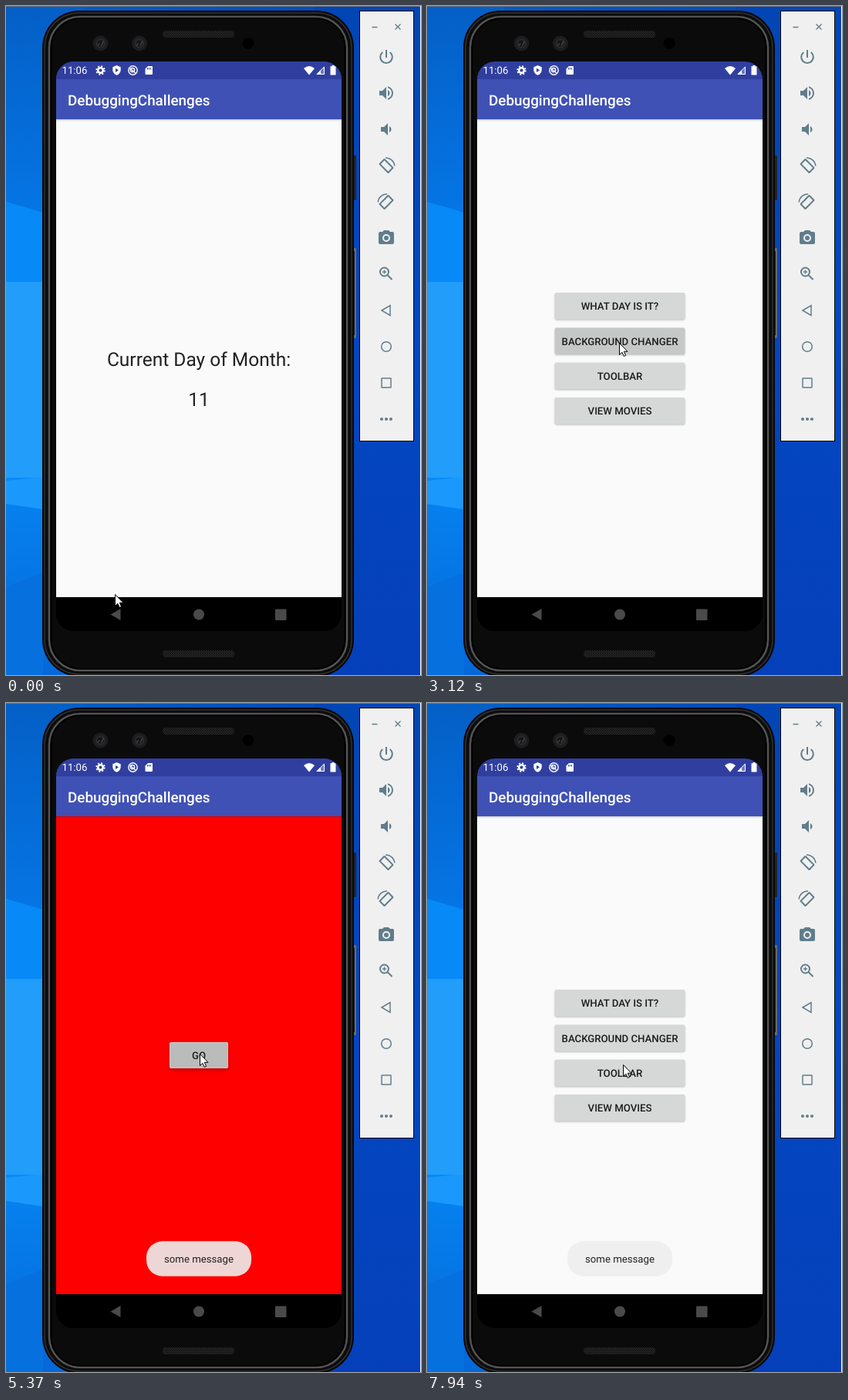
An HTML page for the animation above (8000 ms loop, 538 px wide and 868 px high).

```html
<!DOCTYPE html>
<html lang="en">
<head>
<meta charset="utf-8">
<title>Phone emulator demo</title>
<style>
html, body { margin: 0; width: 100%; height: 100%; overflow: hidden; background: #0540ba; }
svg { display: block; width: 538px; height: 868px; }
text { font-family: Roboto, sans-serif; fill: #212121; text-rendering: geometricPrecision; }
.mid { text-anchor: middle; }
.title { font-size: 18.85px; font-weight: 500; fill: #fff; }
.big { font-size: 24.5px; }
.label { font-size: 13.19px; font-weight: 500; text-anchor: middle; fill: #1c1c1c; }
.small { font-size: 13.19px; }
.light { fill: #fff; }
.raised { filter: drop-shadow(0 1px 1px rgba(0,0,0,.25)); }
.button { fill: #d6d7d7; }
.line { fill: none; stroke: #607d8b; stroke-width: 2; }
.line.thin { stroke-width: 1.5; }

.window { transform-origin: 250px 441.5px; }
#menu, #day, #go, #page, #press, #ripple, #toast, #cursor, #goButton, #changer {
  animation: 8s step-end -5ms infinite;
}
#day { animation-name: day; }
#menu { animation-name: menu; }
#go { animation-name: go; }
#page { animation-name: page; }
#goButton { animation-name: lift; }
#press { animation-name: press; }
#ripple { animation-name: ripple; }
#changer { animation-name: changer; }
#toast { animation-name: toast; }
#cursor { animation-name: cursor; }

@keyframes day { 0% { opacity: 1 } 22% { opacity: 0 } }
@keyframes menu {
  0% { transform: scale(1.03) }
  23.5% { transform: scale(1.005) }
  25.375% { transform: scale(1) }
  42% { transform: scale(1.045) }
  89.5% { transform: scale(1.016) }
  91.375% { transform: scale(1.003) }
  92.875% { transform: scale(1) }
}
@keyframes go {
  0% { opacity: 0; transform: scale(.985) }
  42% { opacity: 1; transform: scale(.985) }
  43.5% { opacity: 1; transform: scale(1) }
  89.5% { opacity: 0; transform: scale(1) }
}
@keyframes page {
  0% { fill: #fafafa }
  51.875%, 67.125% { fill: #f00 }
  58.375%, 75.125% { fill: #00f }
}
@keyframes lift {
  0%, 53.625%, 60.25%, 69%, 76.625% { filter: drop-shadow(0 1px 1px rgba(0,0,0,.25)) }
  50%, 58.375%, 67.125%, 75.125% { filter: drop-shadow(0 2px 2.5px rgba(0,0,0,.28)) }
}
@keyframes press {
  0%, 55.375%, 60.25%, 70.5%, 78.375% { opacity: 0 }
  50%, 58.375%, 67.125%, 75.125% { opacity: 1 }
  53.625%, 69%, 76.625% { opacity: .4 }
}
@keyframes ripple { 0%, 58.375% { opacity: 0 } 56.875% { opacity: 1 } }
@keyframes changer {
  0%, 43.5% { fill: #d6d7d7 }
  39% { fill: #c6c7c7 }
  40.5% { fill: #babcbb }
}
@keyframes toast { 0% { opacity: 0 } 53.625% { opacity: .5 } 55.375% { opacity: 1 } }
@keyframes cursor {
  0% { transform: translate(141px, 763px) }
  16.5% { transform: translate(138px, 780px) }
  18.125% { transform: translate(141px, 787px) }
  27% { transform: translate(198px, 535px) }
  28.875% { transform: translate(246px, 469px) }
  30.75% { transform: translate(245px, 460px) }
  32.25% { transform: translate(250px, 450px) }
  33.75% { transform: translate(253px, 443px) }
  35.25% { transform: translate(250px, 439px) }
  37.125% { transform: translate(249px, 437px) }
  45% { transform: translate(255px, 448px) }
  46.875% { transform: translate(251px, 455px) }
  78.375% { transform: translate(116px, 721px) }
  80.375% { transform: translate(120px, 778px) }
  82.25% { transform: translate(130px, 794px) }
  84.125% { transform: translate(149px, 794px) }
  92.875% { transform: translate(205px, 610px) }
  94.375% { transform: translate(262px, 485px) }
  95.875% { transform: translate(274px, 460px) }
  99.25% { transform: translate(254px, 469px) }
}
</style>
</head>
<body>
<svg viewBox="0 0 538 868">
  <defs>
    <linearGradient id="across">
      <stop offset="0" stop-color="#045fc6"/>
      <stop offset="1" stop-color="#0246b4"/>
    </linearGradient>
    <linearGradient id="sky" x2="0" y2="1">
      <stop offset="0" stop-color="#045fc6"/>
      <stop offset=".3" stop-color="#0575e4"/>
      <stop offset=".75" stop-color="#0680ee"/>
      <stop offset="1" stop-color="#0568d8"/>
    </linearGradient>
    <linearGradient id="night" x2="0" y2="1">
      <stop offset="0" stop-color="#0246b4"/>
      <stop offset=".5" stop-color="#0347c2"/>
      <stop offset="1" stop-color="#0540ba"/>
    </linearGradient>
    <linearGradient id="shade" x2="0" y2="1">
      <stop offset="0" stop-opacity=".18"/>
      <stop offset="1" stop-opacity="0"/>
    </linearGradient>
    <pattern id="mesh" width="3" height="3" patternUnits="userSpaceOnUse">
      <rect width="3" height="3" fill="#262626"/>
      <path d="M0 0l3 3M3 0L0 3" stroke="#111" stroke-width=".8"/>
    </pattern>
    <clipPath id="screen"><rect x="65" y="72" width="370" height="739" rx="23"/></clipPath>
    <clipPath id="goShape"><rect x="212" y="440" width="76" height="34" rx="2"/></clipPath>
    <g id="chrome">
      <rect x="65" y="72" width="370" height="23.200" fill="#303f9f"/>
      <rect x="65" y="95" width="370" height="52" fill="#3f51b5"/>
      <rect x="65" y="147" width="370" height="3" fill="url(#shade)"/>
      <text class="title" x="80" y="128.500">DebuggingChallenges</text>
      <rect x="65" y="767" width="370" height="46"/>
    </g>
    <g id="lens">
      <circle r="10" fill="#1d1d1f"/>
      <circle r="6.500" fill="#29292b"/>
      <circle r="4" fill="#151517"/>
      <path d="M-4 3l3-3M1 3l3-6" stroke="#434347" stroke-width="1.500"/>
    </g>
    <g id="turn">
      <rect x="-4.300" y="-7.800" width="8.600" height="15.600" rx=".5" class="line" transform="rotate(-45)"/>
      <path class="line thin" d="M-1-10.500A11.500 11.500 0 0 1 10.800 0"/>
    </g>
  </defs>

  <!-- desktop -->
  <rect width="538" height="868" fill="url(#across)"/>
  <rect width="100" height="868" fill="url(#sky)"/>
  <rect x="400" width="138" height="868" fill="url(#night)"/>
  <path d="M0 254L48 268V653L0 646z" fill="#078af8"/>
  <path d="M0 616L48 611V653L0 646z" fill="#1a98fc"/>
  <rect x="-207" y="358" width="254" height="254" fill="#229df9"/>
  <path d="M0 754L48 735V868H0z" fill="#0570de"/>
  <rect width="538" height="1" fill="#6c7078"/>
  <rect x="537" width="1" height="868" fill="#fff"/>

  <!-- phone body -->
  <rect x="449" y="194" width="5" height="58" rx="1" fill="#242424"/>
  <rect x="449" y="314" width="5" height="117" rx="1" fill="#6a6a6a"/>
  <rect x="450" y="318" width="2" height="109" fill="#222"/>
  <g fill="none">
    <rect x="47.500" y="6.500" width="403" height="863" rx="47" fill="#0b0b0b" stroke="#050505"/>
    <rect x="50" y="9" width="398" height="858" rx="45" stroke="#303030" stroke-width="1.500"/>
    <rect x="53" y="11.500" width="392" height="853" rx="43" stroke="#0c0c0c" stroke-width="3"/>
    <rect x="56" y="14" width="386" height="848" rx="40" stroke="#545454" stroke-width="2.500"/>
    <rect x="58.500" y="16" width="381" height="844" rx="38" stroke="#000" stroke-width="2"/>
  </g>
  <rect x="203" y="32" width="93" height="9" rx="4" fill="url(#mesh)"/>
  <rect x="203" y="836" width="93" height="9" rx="4" fill="url(#mesh)"/>
  <use href="#lens" x="122.500" y="48.500"/>
  <use href="#lens" x="173" y="48.500"/>
  <circle cx="314" cy="48.500" r="7.500" fill="#000"/>

  <!-- phone screen -->
  <g clip-path="url(#screen)">
    <rect x="65" y="72" width="370" height="739"/>
    <g id="menu" class="window">
      <rect x="65" y="72" width="370" height="739" fill="#fafafa"/>
      <use href="#chrome"/>
      <g class="raised">
        <rect class="button" x="165.700" y="372" width="168.600" height="34.500" rx="2"/>
        <rect id="changer" x="165.700" y="417.400" width="168.600" height="34.500" rx="2"/>
        <rect class="button" x="165.700" y="462.700" width="168.600" height="34.500" rx="2"/>
        <rect class="button" x="165.700" y="508" width="168.600" height="34.500" rx="2"/>
      </g>
      <text class="label" x="250" y="394.200">WHAT DAY IS IT?</text>
      <text class="label" x="250" y="439.500">BACKGROUND CHANGER</text>
      <text class="label" x="250" y="484.900">TOOLBAR</text>
      <text class="label" x="250" y="530.200">VIEW MOVIES</text>
    </g>
    <g id="day" class="window">
      <rect x="65" y="72" width="370" height="739" fill="#fafafa"/>
      <use href="#chrome"/>
      <text class="big mid" x="250" y="467">Current Day of Month:</text>
      <text class="big mid" x="250" y="519">11</text>
    </g>
    <g id="go" class="window">
      <rect id="page" x="65" y="72" width="370" height="739"/>
      <use href="#chrome"/>
      <g id="goButton">
        <rect class="button" x="212" y="440" width="76" height="34" rx="2"/>
        <g clip-path="url(#goShape)">
          <circle id="ripple" cx="251" cy="458" r="27" fill="#c6c8c7"/>
        </g>
        <rect id="press" x="212.500" y="440.500" width="75" height="33" rx="2" fill="#babcbb"/>
      </g>
      <text class="label" x="250" y="462.200">GO</text>
    </g>
    <g id="toast">
      <rect x="182" y="698.300" width="136" height="45.400" rx="20.700" fill="#eee" fill-opacity=".9"/>
      <text class="small mid" x="250" y="726">some message</text>
    </g>

    <!-- status bar -->
    <g fill="#fff">
      <text class="small light" x="72.500" y="88">11:06</text>
      <g fill="none" stroke="#fff">
        <circle cx="122.500" cy="83.500" r="3.300" stroke-width="2.500"/>
        <circle cx="122.500" cy="83.500" r="5.300" stroke-width="1.800" stroke-dasharray="2.080"/>
        <circle cx="164.500" cy="83.500" r="5.700" stroke-width="1.400"/>
        <circle cx="164" cy="83" r="2.600" stroke-width="1.500"/>
        <path d="M160.500 81l7.500 6" stroke-width="1.300"/>
      </g>
      <path d="M143.500 77l5.200 2.300v3.500c0 3.200-2.200 6-5.200 7-3-1-5.200-3.800-5.200-7v-3.500z"/>
      <path d="M142 80.700l4 2.600-4 2.600z" fill="#303f9f"/>
      <path d="M184 78h5q1 0 1 1v9q0 1-1 1h-7.500q-1 0-1-1v-6.500z"/>
      <path d="M183.500 80v2.500M185.500 80v2.500M187.500 80v2.500" stroke="#303f9f"/>
      <path d="M393 89.500l-7-8.500q7-6 14 0z"/>
      <path d="M413 78v11h-11z" fill-opacity=".3"/>
      <path d="M412.500 79v9.500h-9.500z" fill="none" stroke="#fff"/>
      <path d="M408 83.500v5h-5z"/>
      <path d="M422.500 77h3v1.300h2V89.500h-7V78.300h2z"/>
    </g>
    <!-- navigation bar -->
    <g fill="#4a4a4a">
      <path d="M135.500 789.500l13-7.500v15z"/>
      <circle cx="250" cy="789.500" r="7"/>
      <rect x="349" y="782.500" width="14.500" height="14.500" rx="1"/>
    </g>
  </g>

  <!-- emulator toolbox -->
  <rect x="458.500" y="6.500" width="70" height="558" fill="#f0f0f0" stroke="#000"/>
  <path d="M474.500 27.500h7M504.500 23.500l7 7m0-7l-7 7" stroke="#607d8b" stroke-width="1.300"/>
  <g fill="#607d8b">
    <path class="line" d="M493 57v10M488.300 60a7.800 7.800 0 1 0 9.400 0"/>
    <path transform="translate(481 101)" d="M3 9v6h4l5 5V4L7 9zM16.500 12c0-1.770-1.020-3.290-2.500-4.030v8.050c1.480-.73 2.500-2.250 2.500-4.020zM14 3.230v2.060a7 7 0 0 1 0 13.420v2.060a9 9 0 0 0 0-17.540z"/>
    <path transform="translate(481 148)" d="M18.500 12c0-1.770-1.020-3.290-2.500-4.030v8.050c1.480-.73 2.500-2.250 2.500-4.020zM5 9v6h4l5 5V4L9 9z"/>
    <use href="#turn" x="493" y="207.500"/>
    <use href="#turn" transform="translate(493 254.500) scale(-1 1)"/>
    <path d="M490 291h6l2 2h3q2 0 2 2v12q0 2-2 2h-16q-2 0-2-2v-12q0-2 2-2h3z"/>
    <circle cx="493" cy="301" r="4" stroke="#f0f0f0" stroke-width="2"/>
    <circle class="line" cx="490.500" cy="345" r="5.500"/>
    <path class="line" d="M494.500 349l6 6"/>
    <path class="line thin" d="M488 345h5m-2.500-2.500v5"/>
    <path class="line thin" d="M487 395l11-6.500v13z"/>
    <circle class="line thin" cx="493" cy="442" r="6.300"/>
    <rect class="line thin" x="487" y="483" width="12" height="12" rx=".5"/>
    <circle cx="487" cy="536" r="2"/>
    <circle cx="493" cy="536" r="2"/>
    <circle cx="499" cy="536" r="2"/>
  </g>

  <g id="cursor">
    <path d="M.5.5v15l3.400-3.200 2.300 5.100 2.400-1-2.300-5.100h4.700z" fill="#fff" stroke="#000"/>
  </g>
</svg>
</body>
</html>
```
